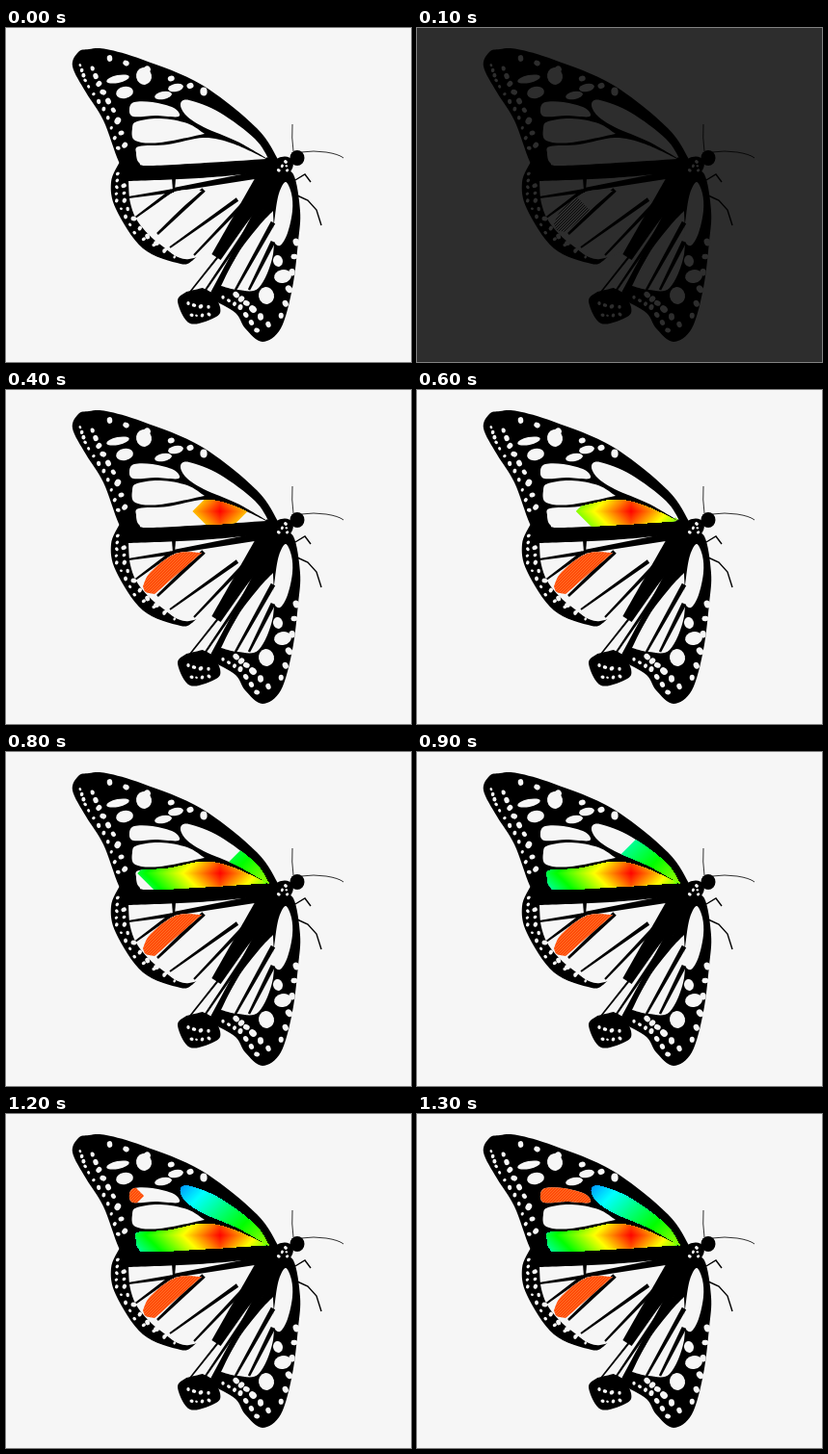
An HTML page with a canvas for the animation above (1400 ms loop, 420 px wide and 347 px high).

```html
<!DOCTYPE html>
<html lang="en">
<head>
<meta charset="utf-8">
<title>Butterfly colouring</title>
<style>
html, body { margin: 0; width: 100%; height: 100%; overflow: hidden; background: #f6f6f6; }
canvas { display: block; width: 420px; height: 347px; }
</style>
</head>
<body>
<canvas id="stage" width="420" height="347"></canvas>
<script>
const ctx = document.getElementById('stage').getContext('2d');
const STEP = 100, STEPS = 14;

const points = text => text.trim().split(/\s+/).map(p => p.split(',').map(Number));

// Closed curve through key points; a point marked with "!" is a sharp corner
function curve(text) {
  const pts = points(text.replace(/(\S+)!/g, '$1 $1'));
  const at = i => pts[(i + pts.length) % pts.length];
  const path = new Path2D();
  path.moveTo(...pts[0]);
  pts.forEach((b, i) => {
    const a = at(i - 1), c = at(i + 1), d = at(i + 2);
    if (b[0] === c[0] && b[1] === c[1]) return;
    path.bezierCurveTo(b[0] + (c[0] - a[0]) / 6, b[1] + (c[1] - a[1]) / 6,
      c[0] - (d[0] - b[0]) / 6, c[1] - (d[1] - b[1]) / 6, ...c);
  });
  return path;
}

const wings = [
  '69,40 75,25 86,22 104,22 142,33 203,59 260,104 283,138! 262,154! 130,160! 117,139 101,96 83,67',
  '118,139! 109,160 114,188 142,229 181,245 193,242! 240,200 280,150! 130,148!',
  '178,284 187,274! 204,270! 214,276 222,290 218,300 191,307',
  '282,148! 298,152 305,190 303,222 297,270 285,312 266,326 248,312 238,296 214,282! 213,274! 240,230 268,185'
].map(curve);

const upper = curve('181,79 190,75 222,88 258,115 273,137! 240,118 205,103 187,91');
const lower = curve('135,130 138,123 168,121 205,114 235,120 270,136! 225,139 150,143 138,140');
const band = curve('128,84 133,77 152,77 174,83 179,92 155,91 132,92');
const patch = curve('142,204! 150,189 176,170 203,169! 178,191 154,212! 145,210');
const cells = [
  '131,104 136,97 160,94 188,99 206,110! 160,119 134,117',
  '127,159! 200,156 268,150! 235,215 190,240 160,225 138,203 129,182',
  '283,172 290,160 296,172 297,190 292,213 284,226 277,219 279,195',
  '277,190! 277,235 262,270 240,272 223,268! 240,235 262,206'
].map(curve);

// Each vein: start, end, and its width at the start
const veins = [
  ['280,140 218,238', 22], ['284,150 214,276', 9], ['264,182 191,274', 3], ['256,200 205,275', 4],
  ['270,151 174,168', 8], ['174,169 127,176', 4], ['174,155 174,170', 4], ['172,169 134,197', 4],
  ['205,168 157,214', 5], ['240,178 170,228', 4], ['256,172 195,236', 4],
  ['277,202 238,272', 5], ['277,222 252,272', 5]
].map(([line, width]) => [...points(line), width]);

// Each row: the line it follows, number of spots, mean radius
const rows = [
  ['76,36 83,57 104,88 118,130', 12, 1.9], ['88,38 98,62 114,90 125,128', 9, 2.9],
  ['99,29 133,39 184,57 212,69', 6, 3.4],
  ['116,148 114,178 134,214 180,241', 13, 1.8], ['122,160 123,183 142,213 170,234', 9, 2.2],
  ['222,278 243,290 263,318', 7, 2.3], ['236,275 252,288 276,312', 6, 3.4],
  ['302,215 298,245 292,280 283,305', 6, 3],
  ['186,285 198,289 214,290', 4, 1.9], ['190,298 200,299 214,297', 4, 1.6]
].map(([line, ...rest]) => [points(line), ...rest]);

// Large spots: centre, half width, half height
const spots = points(`116,53,12,4 123,67,9,6 143,50,8,9 163,70,9,4 176,62,8,4
  287,258,9,7 270,278,8,9 282,242,5,6`);

const antennae = new Path2D('M298 128Q296 114 297 100M306 129Q319 127 332 129T350 135');
const legs = new Path2D('M300 158L310 152L316 160M302 174L313 179L322 189L327 205');

let seed;
function random() {
  seed = (seed * 16807) % 2147483647;
  return seed / 2147483647;
}

function along(pts, t) {
  const i = Math.min(Math.floor(t * (pts.length - 1)), pts.length - 2);
  const f = t * (pts.length - 1) - i;
  return pts[i].map((v, k) => v + (pts[i + 1][k] - v) * f);
}

function ellipse(x, y, rx, ry = rx, tilt = 0) {
  ctx.beginPath();
  ctx.ellipse(x, y, rx, ry, tilt, 0, 7);
  ctx.fill();
}

function spotRow(pts, count, radius) {
  for (let i = 0; i < count; i++) {
    const r = radius * (0.75 + random() * 0.5);
    ellipse(...along(pts, (i + 0.5) / count), r * 1.1, r * 0.9, random() * 3);
  }
}

function vein([x1, y1], [x2, y2], width) {
  const len = Math.hypot(x2 - x1, y2 - y1);
  const nx = (y2 - y1) / len * width / 2, ny = (x1 - x2) / len * width / 2;
  ctx.beginPath();
  ctx.moveTo(x1 + nx, y1 + ny);
  ctx.lineTo(x2 + nx / 2, y2 + ny / 2);
  ctx.lineTo(x2 - nx / 2, y2 - ny / 2);
  ctx.lineTo(x1 - nx, y1 - ny);
  ctx.fill();
}

function butterfly(paper) {
  seed = 71;
  ctx.fillStyle = paper;
  ctx.fillRect(0, 0, 420, 347);
  ctx.fillStyle = ctx.strokeStyle = '#000';
  wings.forEach(w => ctx.fill(w));
  ctx.fillStyle = paper;
  [...cells, upper, lower, band].forEach(c => ctx.fill(c));
  ctx.fillStyle = '#000';
  veins.forEach(v => vein(...v));
  ctx.fillStyle = paper;
  ctx.fill(patch);
  rows.forEach(r => spotRow(...r));
  spots.forEach(s => ellipse(...s, -0.2));
  ctx.fillStyle = '#000';
  ellipse(285, 145, 14, 10, -0.6);
  ellipse(302, 135, 7.5, 8);
  ctx.lineWidth = 0.8;
  ctx.stroke(antennae);
  ctx.lineWidth = 1.4;
  ctx.stroke(legs);
  ctx.fillStyle = paper;
  spotRow([[281, 150], [290, 139], [292, 150]], 5, 1.5);
}

function diamond(x, y, r) {
  return new Path2D(`M${x - r} ${y}L${x} ${y - r}L${x + r} ${y}L${x} ${y + r}Z`);
}

function within(path, draw) {
  ctx.save();
  ctx.clip(path);
  draw();
  ctx.restore();
}

// Rainbow flood: the hue follows the moment each ring is reached
function spread(cell, x, y, begin, speed, t) {
  within(cell, () => {
    for (let k = t; k > begin; k -= 0.05) {
      ctx.fillStyle = `hsl(${22 * k},100%,50%)`;
      ctx.fill(diamond(x, y, speed * (k - begin)));
    }
  });
}

function hatch(cell, x, y, r, fill, line) {
  within(cell, () => within(diamond(x, y, r), () => {
    ctx.fillStyle = fill;
    ctx.fillRect(x - r, y - r, 2 * r, 2 * r);
    ctx.strokeStyle = line;
    ctx.lineWidth = 0.8;
    ctx.beginPath();
    for (let i = -120; i < 120; i += 3) {
      ctx.moveTo(x + i - 50, y + 50);
      ctx.lineTo(x + i + 50, y - 50);
    }
    ctx.stroke();
  }));
}

function draw(n) {
  const dark = n === 1;
  const ink = dark ? ['#2d2d2d', '#000'] : ['#ff4a08', '#ff7a30'];
  butterfly(dark ? '#2d2d2d' : '#f6f6f6');
  if (n > 0) hatch(patch, 150, 202, dark ? 42 : 110, ...ink);
  if (n > 2) {
    spread(lower, 222, 126, 0, 14.3, n - 2);
    spread(upper, 268, 135, 3.9, 27.5, n - 2);
  }
  if (n > 11) hatch(band, 131, 85, n === 12 ? 12 : 70, ...ink);
}

let shown = -1;
const start = performance.now();
function tick(now) {
  const n = Math.floor(Math.max(0, now - start) / STEP) % STEPS;
  if (n !== shown) draw(shown = n);
  requestAnimationFrame(tick);
}
draw(shown = 0);
requestAnimationFrame(tick);
</script>
</body>
</html>
```
